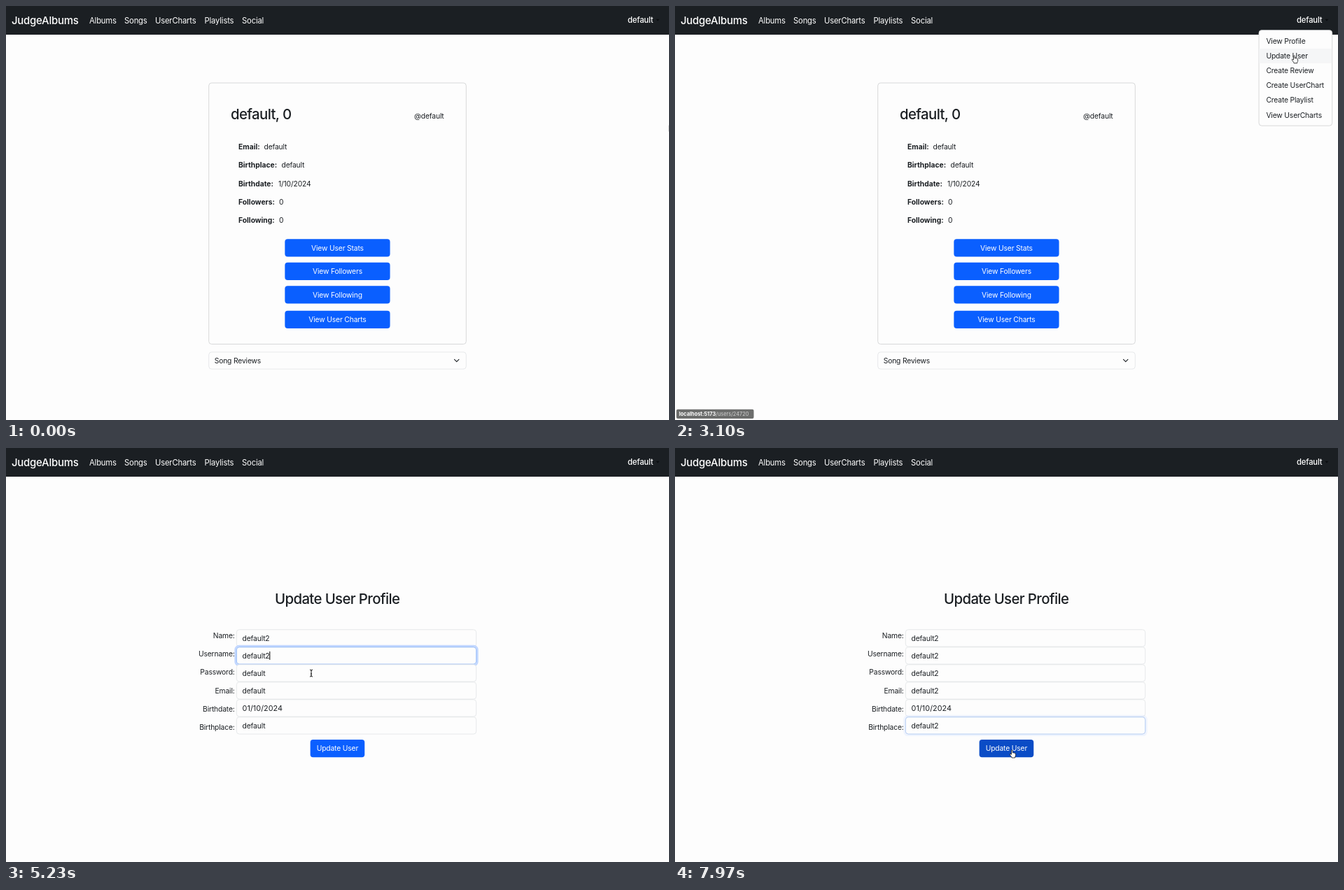
An HTML page for the animation above (8 s loop, 947 by 592 pixels).

```html
<!DOCTYPE html>
<html lang="en">
<head>
<meta charset="utf-8">
<title>Update user profile</title>
<style>
  html, body { margin: 0; width: 100%; height: 100%; overflow: hidden; background: #fdfdfd; }
  svg { display: block; width: 100%; height: 100%; }
  text { font: 400 10.3px Inter, "Open Sans", sans-serif; letter-spacing: -.015em; fill: #1b1f23; white-space: pre; }
  .title { font-size: 20.4px; font-weight: 550; letter-spacing: -.031em; }
  .bold { font-weight: 700; letter-spacing: 0; }
  .nav { font-size: 11.25px; fill: #fff; }
  .user { font-weight: 500; }
  .brand { font-size: 14.9px; font-weight: 450; fill: #fff; }
  .date { font-size: 10.8px; letter-spacing: .005em; }
  .light { fill: #fff; }
  .mid { text-anchor: middle; }
  .end { text-anchor: end; }
  .url { font-size: 7.4px; fill: #d2d2d2; letter-spacing: 0; }
  .host { fill: #fff; font-weight: 700; }
  .page { fill: #fdfdfd; }
  .navbar { fill: #1b1f23; }
  .button { fill: #0a5fff; }
  .badge { fill: #6c6d6c; }
  .box { fill: #fdfdfd; stroke: #dadde1; stroke-width: .66; }
  .card { stroke: #cfd0d1; stroke-width: .8; }
  .line { fill: none; stroke: #1b1f23; stroke-width: 1.1; stroke-linecap: round; stroke-linejoin: round; }
  .ring { fill: none; stroke: #c2d7ff; stroke-width: 2.63; }
  .edge { fill: none; stroke: #86b4fe; stroke-width: .8; }
  .pointer { stroke-linejoin: round; stroke-width: .8; }
</style>
</head>
<body>
<svg id="stage" viewBox="0 0 947 592" preserveAspectRatio="none"></svg>
<script>
const LOOP = 8000;
const PAGE_CHANGE = 3330, MENU_OPEN = 2430, PRESS = 7930;
const STATUS = [2650, 3950];
const USER = 'default';

const text = (x, mid, s, cls = '') => `<text x="${x}" y="${mid + 3.8}" class="${cls}">${s}</text>`;
const rect = (x, y, w, h, cls, r = 4) =>
  `<rect x="${x}" y="${y}" width="${w}" height="${h}" rx="${r}" class="${cls}"/>`;
const group = (id, body) => `<g id="${id}">${body}</g>`;
const button = (mid, w, label, id = '') =>
  group(id, rect(473.45 - w / 2, mid - 12.6, w, 25.2, 'button')) + text(473.45, mid, label, 'light mid');

const navLinks = [[119, 'Albums'], [169, 'Songs'], [213, 'UserCharts'], [283.5, 'Playlists'], [337, 'Social']];
const details = [
  ['Email:', USER, 368.5], ['Birthplace:', USER, 393.5], ['Birthdate:', '1/10/2024', 389],
  ['Followers:', '0', 390], ['Following:', '0', 390]
];
const viewButtons = [[345.8, 'User Stats'], [379.4, 'Followers'], [412.9, 'Following'], [448.3, 'User Charts']];
const menuItems = ['View Profile', 'Update User', 'Create Review', 'Create UserChart', 'Create Playlist', 'View UserCharts'];

// Focus, typing and blur times in ms
const fields = [
  { label: 'Name:', on: 4030, typed: 4600, off: 4700, icon: true },
  { label: 'Username:', on: 4700, typed: 4980, off: 5400 },
  { label: 'Password:', on: 5400, typed: 5600, off: 6050 },
  { label: 'Email:', on: 6050, typed: 6240, off: 6680, icon: true },
  { label: 'Birthdate:', date: '01/10/2024' },
  { label: 'Birthplace:', on: 6680, typed: 6980, off: PRESS }
];

// Pointer path: time, x, y
const path = [
  [0, 946.4, 170], [1600, 946.4, 170], [2000, 938, 100], [2330, 919, 28], [2470, 918, 25],
  [2560, 916, 27], [2850, 886, 70], [3200, 884, 71], [3300, 884, 71], [3570, 536, 218],
  [3980, 438, 272], [4330, 438, 272], [4430, 438, 290], [4560, 438, 297], [5000, 437, 297],
  [5130, 436, 313], [5230, 436, 322], [5870, 436, 322], [6030, 440, 347], [6300, 440, 352],
  [6400, 440, 354], [6640, 440, 396], [7050, 440, 396], [7470, 481, 431.5], [8000, 481.5, 432]
];

const fieldMarkup = (f, i) => {
  const y = 259.4 + 25 * i, mid = y + 12.5;
  const icon = f.icon ? `<g class="icon">
    <circle cx="651.5" cy="${mid}" r="3.8" class="line"/>
    <circle cx="651.5" cy="${mid - 1}" r="1.4"/>
    <path d="M649 ${mid + 2.5}q2.5-3 5 0q-2.5 2-5 0z"/>
    <path d="M657.4 ${mid - 1}l2.2 2.2l2.2-2.2" class="line"/></g>` : '';
  return text(326.6, 267.8 + 26.3 * i, f.label, 'end') + group('field' + i,
    rect(329.3, y + .33, 342.4, 24.33, 'box') +
    rect(327.7, y - 1.3, 345.6, 27.6, 'ring', 5) + rect(329.3, y + .33, 342.4, 24.33, 'edge') +
    text(337.6, mid, f.date || USER, f.date ? 'value date' : 'value') +
    `<rect class="caret" y="${mid - 6}" width="1" height="12"/>` + icon);
};

const stage = document.getElementById('stage');
stage.innerHTML =
  rect(0, 0, 947, 592, 'page', 0) +
  group('profile',
    rect(289.7, 110, 367.6, 373.5, 'box card') +
    `<text x="321" y="162.3" class="title">${USER}, 0</text>` +
    text(625.6, 157.2, '@' + USER, 'end') +
    details.map(([name, value, x], i) =>
      text(332, 201.3 + 26.3 * i, name, 'bold') + text(x, 201.3 + 26.3 * i, value)).join('') +
    viewButtons.map(([mid, name]) => button(mid, 150.2, 'View ' + name)).join('') +
    rect(289.7, 494.9, 367.6, 24.2, 'box') + text(297.7, 507.1, 'Song Reviews') +
    '<path d="M640.5 505.4l3.2 3.2l3.2-3.2" class="line"/>') +
  group('form',
    '<text x="473.2" y="223.2" class="title mid">Update User Profile</text>' +
    fields.map(fieldMarkup).join('') + button(429.6, 77.6, 'Update User', 'submit')) +
  rect(0, 0, 947, 41, 'navbar', 0) +
  '<text x="8" y="26" class="brand">JudgeAlbums</text>' +
  navLinks.map(([x, s]) => text(x, 20.8, s, 'nav')).join('') +
  text(888, 20.5, USER, 'nav user') +
  '<path d="M928.4 18.8h5l-2.5 2.6z" fill="#0a0c0e"/>' +
  group('menu',
    rect(834, 34.6, 104.7, 136.6, 'box card') +
    '<rect id="hover" x="834.5" width="103.7" height="21" fill="#f5f6f7"/>' +
    menuItems.map((s, i) => text(844.4, 50.2 + 21.1 * i, s)).join('')) +
  group('status',
    rect(2, 576.7, 110.5, 13.3, 'badge', 2) +
    '<text x="5.8" y="586" class="url"><tspan class="host">localhost:5173</tspan>/users/24720</text>') +
  group('pointer',
    '<path id="arrow" class="pointer" fill="#111" stroke="#fff" d="M0 0v10l2.3-2.1l1.5 3.4l1.7-.7l-1.5-3.3h3.1z"/>' +
    '<g id="beam" fill="none"><path d="M-2-5q2 0 2 1.4q0-1.4 2-1.4M0-4v8M-2 5q2 0 2-1.4q0 1.4 2 1.4M-1 1h2" stroke="#fff" stroke-width="2.2"/>' +
    '<path d="M-2-5q2 0 2 1.4q0-1.4 2-1.4M0-4v8M-2 5q2 0 2-1.4q0 1.4 2 1.4M-1 1h2" stroke="#111"/></g>' +
    '<path id="hand" class="pointer" fill="#fff" stroke="#111" d="M-1 .6q1-1.2 1.8 0v3.3q1-.7 1.6.2q1-.5 1.5.4q1.2-.2 1.2 1v2.3q-.3 1.3-.9 2v1.2h-4.6q-.3-1.5-1.6-2.8q-1.5-2-1.2-2.6q.7-.8 2.2.7z"/>');

const $ = id => document.getElementById(id);
const show = (el, on) => { el.style.display = on ? '' : 'none'; };
const clamp = v => Math.max(0, Math.min(1, v));
const inside = (x, y, l, t, r, b) => x > l && x < r && y > t && y < b;

const fieldParts = fields.map((f, i) => {
  const find = cls => $('field' + i).querySelector(cls);
  return { ring: find('.ring'), edge: find('.edge'), value: find('.value'), caret: find('.caret'), icon: find('.icon') };
});

function pointerAt(t) {
  const i = path.findIndex(p => p[0] > t);
  const [t0, x0, y0] = path[i - 1], [t1, x1, y1] = path[i];
  const u = (t - t0) / (t1 - t0), k = .5 * u + .5 * u * u * (3 - 2 * u);
  return [x0 + (x1 - x0) * k, y0 + (y1 - y0) * k];
}

function pointerKind(t, x, y) {
  if (t < PAGE_CHANGE)
    return inside(x, y, 884, 12, 936, 32) || (t >= MENU_OPEN && inside(x, y, 834, 25, 939, 171)) ? 'hand' : 'arrow';
  if (inside(x, y, 434, 416, 513, 443)) return 'hand';
  return inside(x, y, 329, 259, 672, 410) || inside(x, y, 383, 204, 563, 229) ? 'beam' : 'arrow';
}

function drawField(f, part, t) {
  const focus = f.on ? clamp((t - f.on) / 90) * (1 - clamp((t - f.off) / 110)) : 0;
  const active = f.on && t >= f.on && t < f.off;
  part.ring.style.opacity = focus ** 3;
  part.edge.style.opacity = focus;
  if (f.on) {
    const value = USER + (t >= f.typed ? '2' : '');
    if (part.value.textContent !== value) part.value.textContent = value;
  }
  const since = t - (t >= f.typed ? f.typed : f.on);
  show(part.caret, active && since % 1000 < 500);
  if (active) part.caret.setAttribute('x', 337.4 + part.value.getComputedTextLength());
  if (part.icon) show(part.icon, active);
}

function render(t) {
  const [x, y] = pointerAt(t), kind = pointerKind(t, x, y);
  const onForm = t >= PAGE_CHANGE;
  show($('profile'), !onForm);
  show($('form'), onForm);
  show($('menu'), t >= MENU_OPEN && !onForm);
  show($('status'), t >= STATUS[0] && t < STATUS[1]);

  const row = Math.floor((y - 39.7) / 21.1);
  show($('hover'), row >= 0);
  $('hover').setAttribute('y', 39.7 + 21.1 * Math.max(0, row));

  if (onForm) fields.forEach((f, i) => drawField(f, fieldParts[i], t));
  $('submit').firstChild.style.fill =
    t >= PRESS ? '#0a4cc6' : onForm && kind === 'hand' ? '#0a51d6' : '';

  $('pointer').setAttribute('transform', `translate(${x} ${y})`);
  for (const id of ['arrow', 'beam', 'hand']) show($(id), id === kind);
}

function tick() {
  render(performance.now() % LOOP);
  requestAnimationFrame(tick);
}
tick();
</script>
</body>
</html>
```
